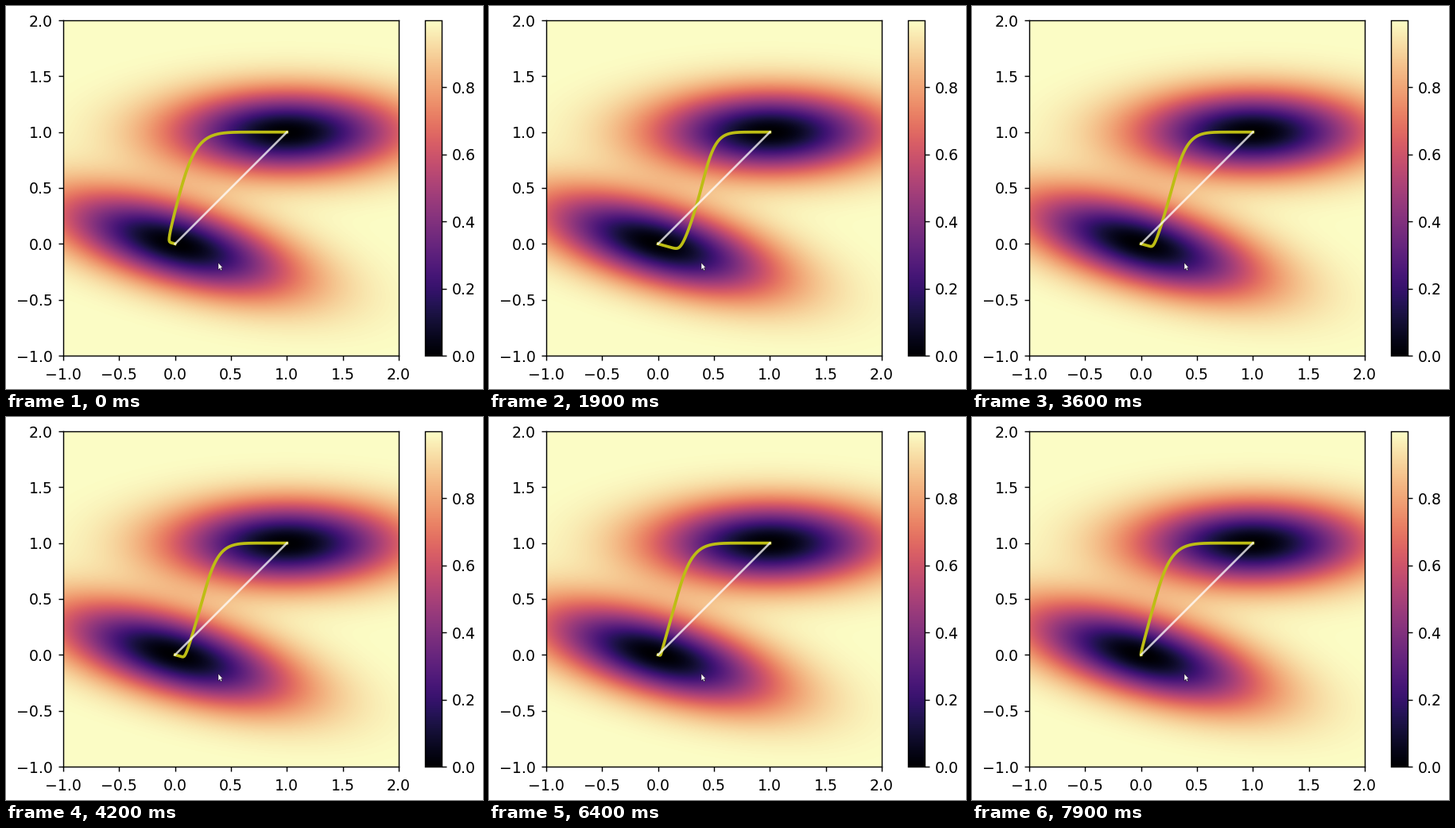
Animation, 600 px wide and 482 px high, one loop 8000 ms. Source, as a matplotlib script:

```python
import numpy as np
import matplotlib.pyplot as plt
from matplotlib.animation import FuncAnimation
from matplotlib.colors import ListedColormap

W, H, DPI = 600, 482, 128
FRAMES, INTERVAL = 80, 100
RUN = 200            # frames from one reset of the string to the next
RESTART = 9          # frame at which the string is reset to a straight line
FLOW_PER_FRAME, SUBSTEPS = 0.065, 10

plt.rcParams.update({
    "font.family": "DejaVu Sans", "font.size": 10.6, "axes.linewidth": 0.8,
    "xtick.major.size": 3.55, "ytick.major.size": 3.55,
    "xtick.major.width": 0.8, "ytick.major.width": 0.8,
    "xtick.major.pad": 4.8, "ytick.major.pad": 3.8,
})

# Each Gaussian well: centre and the quadratic form a x^2 + 2b xy + c y^2.
WELLS = [((1, 1), (1.0, 0.0, 8.0)), ((0, 0), (1.5, 2.0, 8.0))]


def landscape(x, y):
    """Potential of the wells and its gradient."""
    value, grad_x, grad_y = 1.0, 0.0, 0.0
    for (cx, cy), (a, b, c) in WELLS:
        dx, dy = x - cx, y - cy
        well = np.exp(-a * dx**2 - 2 * b * dx * dy - c * dy**2)
        value = value - well
        grad_x = grad_x + 2 * well * (a * dx + b * dy)
        grad_y = grad_y + 2 * well * (b * dx + c * dy)
    return value, grad_x, grad_y


def respace(points):
    """Spread the points evenly along the string."""
    s = np.concatenate([[0], np.cumsum(np.hypot(*np.diff(points)))])
    even = np.linspace(0, s[-1], len(s))
    return np.array([np.interp(even, s, coord) for coord in points])


def relax_string(count=200):
    """String method: slide downhill with fixed ends, then respace."""
    points = np.tile(np.linspace(0, 1, count), (2, 1))
    history = [points]
    for _ in range(RUN - 1):
        points = points.copy()
        for _ in range(SUBSTEPS):
            slope = np.array(landscape(*points)[1:])
            points[:, 1:-1] -= FLOW_PER_FRAME / SUBSTEPS * slope[:, 1:-1]
        points = respace(points)
        history.append(points)
    return history


def recorded_magma():
    """Magma as it looks on a wide-gamut (P3) screen."""
    to_p3 = np.array([[0.8225, 0.1774, 0.0],
                      [0.0332, 0.9669, 0.0],
                      [0.0171, 0.0724, 0.9108]])
    rgb = plt.get_cmap("magma")(np.arange(256))[:, :3]
    linear = np.where(rgb <= 0.04045, rgb / 12.92, ((rgb + 0.055) / 1.055)**2.4)
    mixed = linear @ to_p3.T
    encoded = np.where(mixed <= 0.0031308, 12.92 * mixed,
                       1.055 * mixed**(1 / 2.4) - 0.055)
    return ListedColormap(np.clip(encoded, 0, 1))


def add_axes(left, top, width, height):
    return fig.add_axes([left / W, 1 - (top + height) / H, width / W, height / H])


fig = plt.figure(figsize=(W / DPI, H / DPI), dpi=DPI, facecolor="white")
ax = add_axes(72, 18, 422, 422)
cax = add_axes(527, 18, 21, 422)

grid = np.linspace(-1, 2, 422)
potential = landscape(*np.meshgrid(grid, grid))[0]
image = ax.imshow(potential, extent=(-1, 2, -1, 2), origin="lower", aspect="auto",
                  cmap=recorded_magma(), vmin=0, vmax=0.999,
                  interpolation="bilinear")
ticks = np.arange(-1, 2.1, 0.5)
ax.set(xlim=(-1, 2), ylim=(-1, 2), xticks=ticks, yticks=ticks)
fig.colorbar(image, cax=cax, ticks=np.arange(5) / 5)

history = relax_string()
string, = ax.plot([], [], color=(0.74, 0.74, 0.08), lw=2.1, zorder=3)
ax.plot([0, 1], [0, 1], color="white", alpha=0.75, lw=1.5, zorder=4)

# Mouse pointer, in stage pixels.
overlay = add_axes(0, 0, W, H)
overlay.set(xlim=(0, W), ylim=(H, 0))
overlay.axis("off")
pointer = [(267, 323), (267, 332), (269, 330.2), (270.3, 333),
           (271.8, 332.4), (270.5, 329.5), (272.6, 329.2)]
overlay.fill(*zip(*pointer), facecolor="white", edgecolor="#1a1020", lw=0.3)


def update(frame):
    string.set_data(*history[(frame - RESTART) % RUN])
    return string,


anim = FuncAnimation(fig, update, frames=FRAMES, interval=INTERVAL,
                     repeat=True, repeat_delay=0, blit=False)
plt.show()
```
